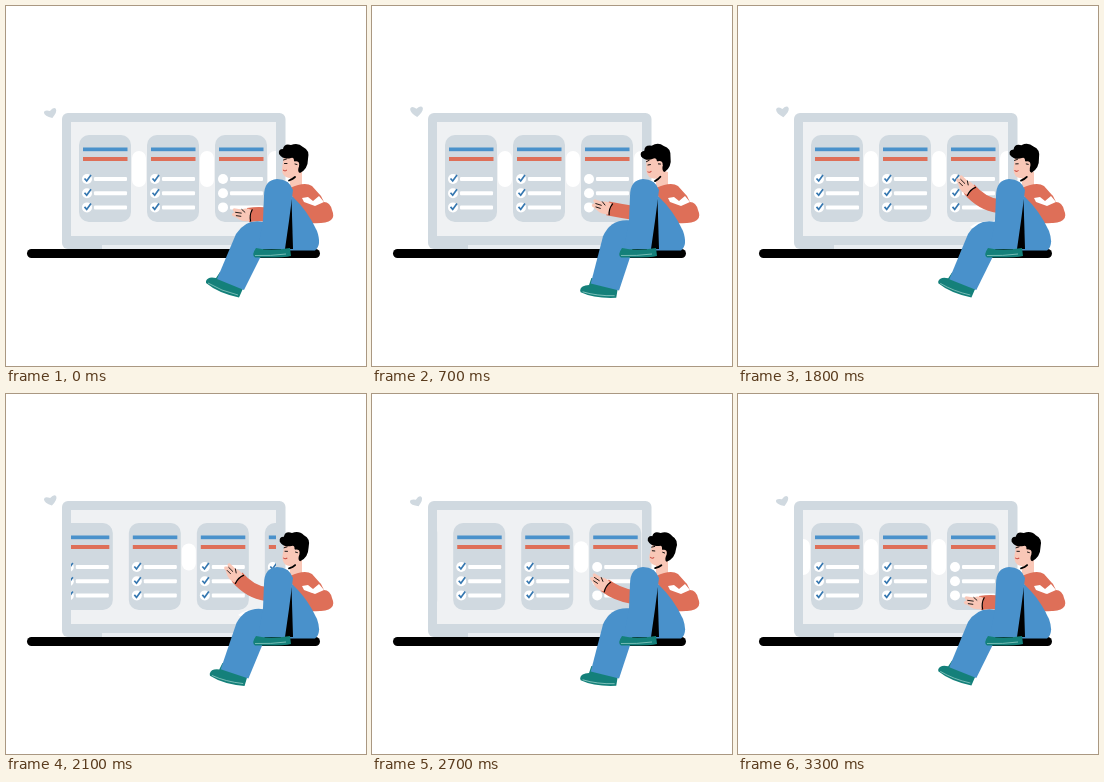
Animation, 360 px wide and 360 px high, one loop 3400 ms. Source, as an HTML page:

```html
<!DOCTYPE html>
<html lang="en">
<head>
<meta charset="utf-8">
<title>Task board</title>
<style>
html, body { margin: 0; width: 100%; height: 100%; overflow: hidden; background: #fff; }
svg { display: block; width: 100vw; height: 100vh; }
.grey { fill: #d0d9e0; }
.blue { fill: #4991cb; }
.red { fill: #de6f58; }
.skin { fill: #f9c7b7; }
.teal { fill: #14807a; }
.white { fill: #fff; }
.line { fill: none; stroke: #000; stroke-linecap: round; }
.shine { fill: none; stroke: #8cc9c2; stroke-width: .8; }
</style>
</head>
<body>
<svg viewBox="0 0 360 360">
  <clipPath id="screen"><rect x="65" y="116" width="205" height="114"/></clipPath>
  <path id="heart" class="grey" d="M0 6Q-7 1-6.300-3Q-5-6.500 0-2.700Q5-6.500 6.300-3Q7 1 0 6Z"/>
  <path id="spark" d="M265.500 91h5M268 88.500v5" stroke="#a9b1b8"/>

  <rect class="grey" x="56" y="107" width="223.500" height="136" rx="6"/>
  <rect x="65" y="116" width="205" height="114" fill="#eff1f3"/>
  <rect x="96" y="239" width="160" height="4" fill="#e9edf1"/>
  <g clip-path="url(#screen)"><g id="cards"></g></g>
  <path id="patch" class="white" d="M232 221Q240 214 257 215V230H243Q240 224 232 221Z"/>
  <rect x="21" y="243" width="293" height="9" rx="4.500"/>

  <g id="leg">
    <g id="foot">
      <path class="teal" d="M200 275Q202 270 210 272L214 266L239 278L233 291.500Q212 287 200 277Z"/>
      <path class="shine" d="M202 277Q215 285 232 289"/>
    </g>
    <path class="blue" d="M230 228Q240 212 258 216L257 246L238 284L211 273Z"/>
  </g>

  <path class="skin" d="M284 163L296 166L296 182L284 182Z"/>
  <path class="red" d="M284 182Q299 175 306 180L315 190L318 196Q324 196 326 204Q329 211 325 214Q320 218 304 217L288 197Z"/>
  <path class="white" d="M296 192L302 191L307 195L313 190L318 196L309 200L298 196Z"/>
  <g id="head">
    <path class="skin" d="M278 149L276 163Q276 171 283 172L292 171L296 153Z"/>
    <path d="M273 148Q272 143 277 143Q278 137 285 139Q292 136 297 141Q304 144 302 153Q302 163 294 167Q291 166 293 160L288 155Q288 151 285 152Q277 154 273 148Z"/>
    <circle class="skin" cx="290" cy="158.500" r="3.200"/>
    <path class="line" d="M277.500 154l3-1M278.500 157.500h2.500M289 158l2 .5" stroke-width=".9"/>
    <path d="M277 164q2 2 4 0" fill="none" stroke="#c94a40"/>
    <path class="line" d="M283 174.500Q287 173 289 171" stroke-width="1.800"/>
  </g>

  <path id="sleeve" fill="none" stroke="#de6f58" stroke-width="14"/>
  <g id="hand">
    <path class="skin" d="M2-5Q-3-6-6-4L-13-4Q-15-2-12-1L-14 1Q-14 3-11 3L-9 4Q-4 7 2 5Z"/>
    <path class="line" d="M-11-.8h5M-10 2h4M-6-4l3 2" stroke-width=".7"/>
    <path class="line" d="M3-5Q1 0 3 5" stroke-width="1"/>
  </g>

  <path class="blue" d="M286 190Q302 205 311 225Q316 239 309 244.500H275Z"/>
  <path d="M285.500 192L287 243H274Z"/>
  <path class="blue" d="M258 190Q258 174 271 173Q283 173 287 184L283 215L279 243H252L257 214Z"/>
  <path class="teal" d="M250 242Q264 245 284 242L285 250Q278 252 249 251.500Q245 249 250 242Z"/>
  <path class="shine" d="M249 249.500Q265 250 280 248"/>
</svg>
<script>
const $ = id => document.getElementById(id);
const LOOP = 3400, STEP = 100, PITCH = 68;

const row = (k, i) => {
  const y = 173 + 14.2 * i;
  return `<circle class="white" cx="81" cy="${y}" r="5"/>
  <rect class="white" x="88" y="${y - 2}" width="33" height="4" rx="1"/>
  <path id="tick${k}${i}" d="M78.500 ${y - .5}l2.200 2.500l4.300-6" fill="none" stroke="#3577b0" stroke-width="1.700"/>`;
};

const card = k => `<g transform="translate(${k * PITCH})">
  <rect class="grey" x="73" y="129" width="52" height="87" rx="10"/>
  <rect class="blue" x="77" y="141.500" width="44.500" height="3.700"/>
  <rect class="red" x="77" y="151" width="44.500" height="4"/>
  ${[0, 1, 2].map(i => row(k, i)).join('')}</g>`;

const gap = k => `<rect id="gap${k}" class="white" x="${126 + k * PITCH}" width="14" rx="7"/>`;

$('cards').innerHTML = [0, 1, 2, 3].map(card).join('') + [0, 1, 2].map(gap).join('');

const show = (id, on) => $(id).setAttribute('visibility', on ? 'visible' : 'hidden');
const move = (id, value) => $(id).setAttribute('transform', value);
const progress = (t, from, to) => Math.min(1, Math.max(0, (t - from) / (to - from)));
const smooth = p => p * p * (3 - 2 * p);

function drawScreen(t) {
  const slide = 1 - (1 - progress(t, 1930, 3110)) ** 2;
  const moving = slide > 0 && slide < 1;
  move('cards', `translate(${-PITCH * slide})`);

  // Third card is ticked from the bottom up; the next one comes in cleared
  for (let i = 0; i < 3; i++) {
    show('tick2' + i, t >= 1450 - 300 * i);
    show('tick3' + i, t < 2500);
  }

  // Only one gap stays lit while the cards slide
  const lit = slide < .75 ? 1 : 2;
  const height = 36 - 12 * Math.sin(Math.PI * slide);
  for (let k = 0; k < 3; k++) {
    show('gap' + k, !moving || k === lit);
    $('gap' + k).setAttribute('y', 163 - height / 2);
    $('gap' + k).setAttribute('height', height);
  }
  show('patch', t >= 1000 && t < 2200);
  show('spark', t >= 2200 && t < 2700);
}

function drawPerson(t, turn) {
  const swing = (1 - Math.cos(2 * turn)) / 2;
  move('leg', `rotate(${-9 * swing} 246 222)`);
  move('foot', `rotate(${-7 * swing} 228 281)`);
  move('head', `rotate(${-7.5 * Math.sin(turn) - 2 * (1 - Math.cos(turn))} 287 175)`);

  const lift = smooth(progress(t, 200, 1700)) - smooth(progress(t, 2400, 3200));
  const x = 242 - 11 * lift ** .4, y = 209 - 26 * lift, elbow = 209 - 9 * lift;
  $('sleeve').setAttribute('d', `M${x} ${y}Q${x + 13} ${elbow - 2} 260 ${elbow}`);
  move('hand', `translate(${x} ${y}) rotate(${8 + 37 * lift}) scale(1.150)`);
}

function drawHeart(turn) {
  const sway = Math.cos(turn - 2.2);
  move('heart', `translate(44.700 ${106.2 - 1.6 * sway}) rotate(${12 * (sway - 1)}) scale(1 ${.9 + .1 * sway})`);
}

const start = performance.now();
function frame() {
  const t = Math.floor((performance.now() - start) % LOOP / STEP) * STEP;
  const turn = t / LOOP * 2 * Math.PI;
  drawScreen(t);
  drawPerson(t, turn);
  drawHeart(turn);
  requestAnimationFrame(frame);
}
frame();
</script>
</body>
</html>
```
